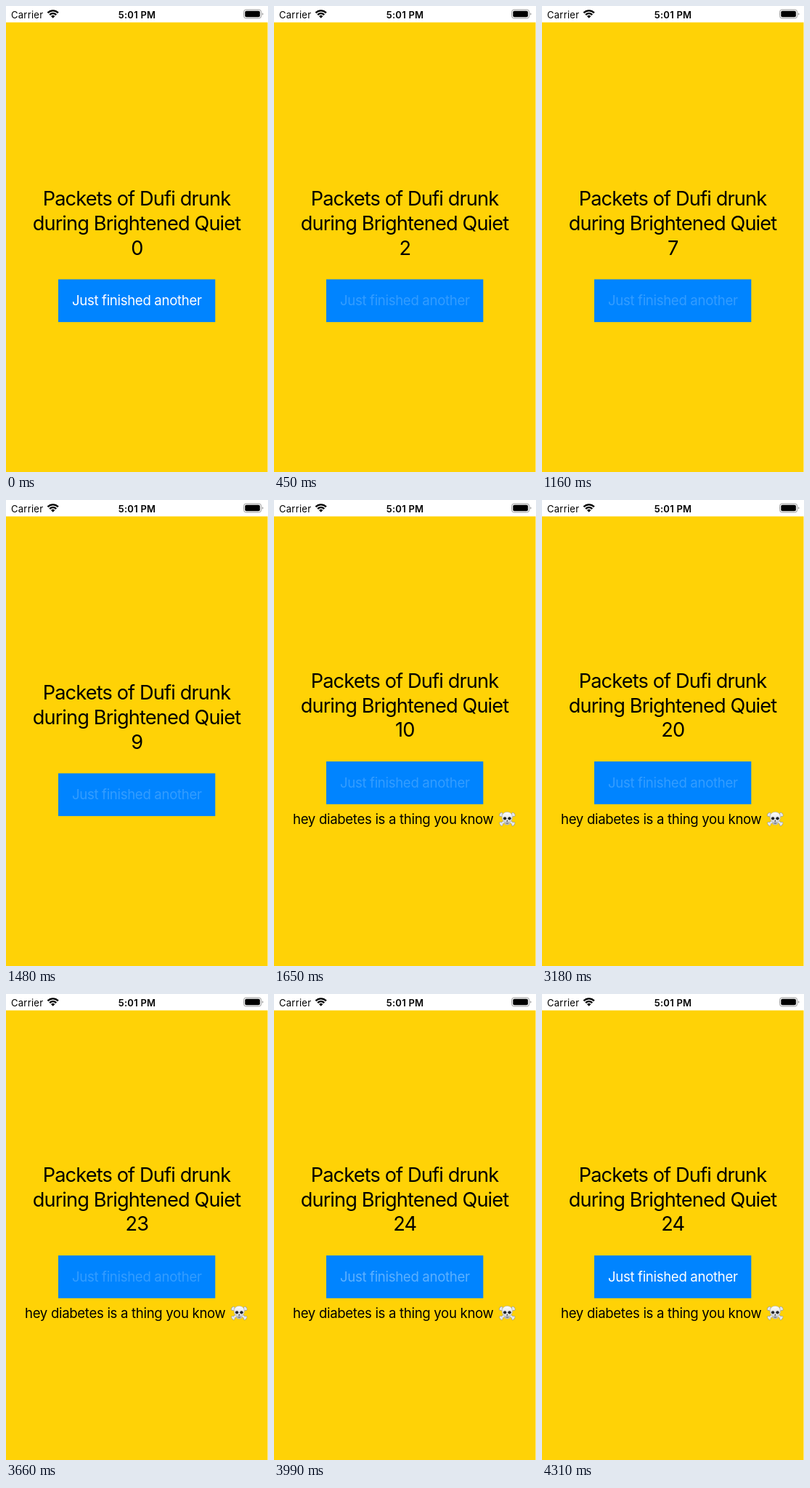
Write an HTML page that moves like this. It is 361 px wide and 640 px high and loops after 4.4 s.

```html
<!DOCTYPE html>
<html lang="en">
<head>
<meta charset="utf-8">
<title>Packet counter</title>
<style>
  html, body { margin: 0; width: 100%; height: 100%; overflow: hidden; background: #fff; }
  svg { display: block; }
  text { font-family: Inter, Roboto, sans-serif; font-optical-sizing: none; }
  .title { font-size: 27.2px; letter-spacing: -.032em; text-anchor: middle; }
  .label { font-size: 18.6px; letter-spacing: -.017em; }
  .status { font-size: 13px; letter-spacing: .02em; }
</style>
</head>
<body>
<svg width="361" height="640" viewBox="0 0 361 640">
  <defs>
    <linearGradient id="bone" x1="0" y1="0" x2="0" y2="1">
      <stop offset="0" stop-color="#fff"/>
      <stop offset="1" stop-color="#c9ccd0"/>
    </linearGradient>
    <g id="bones" fill="none" stroke-linecap="round">
      <path d="M3 5.5 20.5 18.5M21 5.5 3.5 18.5"/>
      <path d="M2.6 6.6 4.2 4.4M19.6 19.6 21.2 17.4M21.4 6.6 19.8 4.4M4.4 19.6 2.8 17.4"/>
    </g>
  </defs>

  <rect y="22.5" width="360.5" height="617.5" fill="#ffd206"/>

  <g class="status">
    <text x="7" y="16.5">Carrier</text>
    <text x="180.5" y="16.5" text-anchor="middle" font-weight="600">5:01 PM</text>
  </g>
  <g id="wifi" fill="none" stroke="#000"></g>
  <rect x="327.6" y="5.1" width="24" height="11.8" rx="3.2" fill="none" stroke="#999"/>
  <rect x="329.3" y="6.8" width="20.6" height="8.4" rx="1.8"/>
  <path d="M353 9.2q1.5 .6 1.5 1.8t-1.5 1.8z" fill="#999"/>

  <g id="panel">
    <g class="title">
      <text x="180" y="274">Packets of Dufi drunk</text>
      <text x="180" y="308">during Brightened Quiet</text>
      <text id="count" x="180.3" y="341.7">0</text>
    </g>
    <rect x="72" y="375.4" width="216.3" height="58.7" fill="#0084ff"/>
    <text id="action" class="label" x="180.3" y="411.4" text-anchor="middle" fill="#fff">Just finished another</text>
  </g>

  <g id="warning" visibility="hidden">
    <text class="label" x="26" y="445.3">hey diabetes is a thing you know</text>
    <g transform="translate(309.3 426.4)">
      <use href="#bones" stroke="#8f9398" stroke-width="3.6"/>
      <use href="#bones" stroke="#e6e8ea" stroke-width="2.5"/>
      <path d="M12 2.2C7.4 2.2 4.9 5.2 4.9 9.2c0 2.4.6 3.4 1.1 4.4.4.9 2.2 1.1 2.4 2.2l.3 3.1q3.3 1.7 6.6 0l.3-3.1c.2-1.1 2-1.3 2.4-2.2.5-1 1.1-2 1.1-4.4 0-4-2.5-7-7.1-7z"
            fill="url(#bone)" stroke="#a4a8ad" stroke-width=".6"/>
      <g fill="#24262a">
        <ellipse cx="8.8" cy="10.9" rx="2.2" ry="2.1"/>
        <ellipse cx="15.2" cy="10.9" rx="2.2" ry="2.1"/>
        <path d="M12 13l1.2 2.2h-2.4z"/>
      </g>
      <path d="M9.4 17.3h5.2M10.8 16.3v2.4M12 16.3v2.6M13.2 16.3v2.4" stroke="#55595e" stroke-width=".5"/>
    </g>
  </g>
</svg>

<script>
  const LOOP = 4400;
  const PRESS = 230;
  const WARN_AT = 10;
  const DIM = 0.2;
  // Times of the taps; each adds one packet.
  const taps = [300, 450, 600, 740, 890, 1020, 1160, 1310, 1480, 1650, 1780, 1930,
    2080, 2240, 2390, 2550, 2720, 2870, 3020, 3180, 3330, 3480, 3660, 3770];
  // Label opacity after the last release: [time, opacity].
  const release = [[3770, .2], [3880, .36], [4000, .6], [4110, .8], [4210, .93], [4310, 1]];

  const $ = id => document.getElementById(id);
  const count = $('count'), action = $('action'), panel = $('panel'), warning = $('warning');

  function arc(r, width) {
    const d = r * Math.SQRT1_2, x = 64.7, y = 16.6;
    return `<path d="M${x - d} ${y - d}A${r} ${r} 0 0 1 ${x + d} ${y - d}" stroke-width="${width}"/>`;
  }
  $('wifi').innerHTML = arc(10.2, 2.4) + arc(6.4, 2.3) +
    '<path d="M64.7 16.8l-2.7-2.8a3.8 3.8 0 0 1 5.4 0z" fill="#000" stroke="none"/>';

  function labelOpacity(t) {
    if (t < PRESS) return 1;
    return release.reduce((value, [at, opacity]) => t >= at ? opacity : value, DIM);
  }

  function draw(t) {
    const n = taps.filter(at => t >= at).length;
    const warned = n >= WARN_AT;
    count.textContent = n;
    action.setAttribute('opacity', labelOpacity(t));
    panel.setAttribute('transform', `translate(0 ${warned ? -16.3 : 0})`);
    warning.setAttribute('visibility', warned ? 'visible' : 'hidden');
  }

  const start = performance.now();
  function tick() {
    draw((performance.now() - start) % LOOP);
    requestAnimationFrame(tick);
  }
  tick();
</script>
</body>
</html>
```
